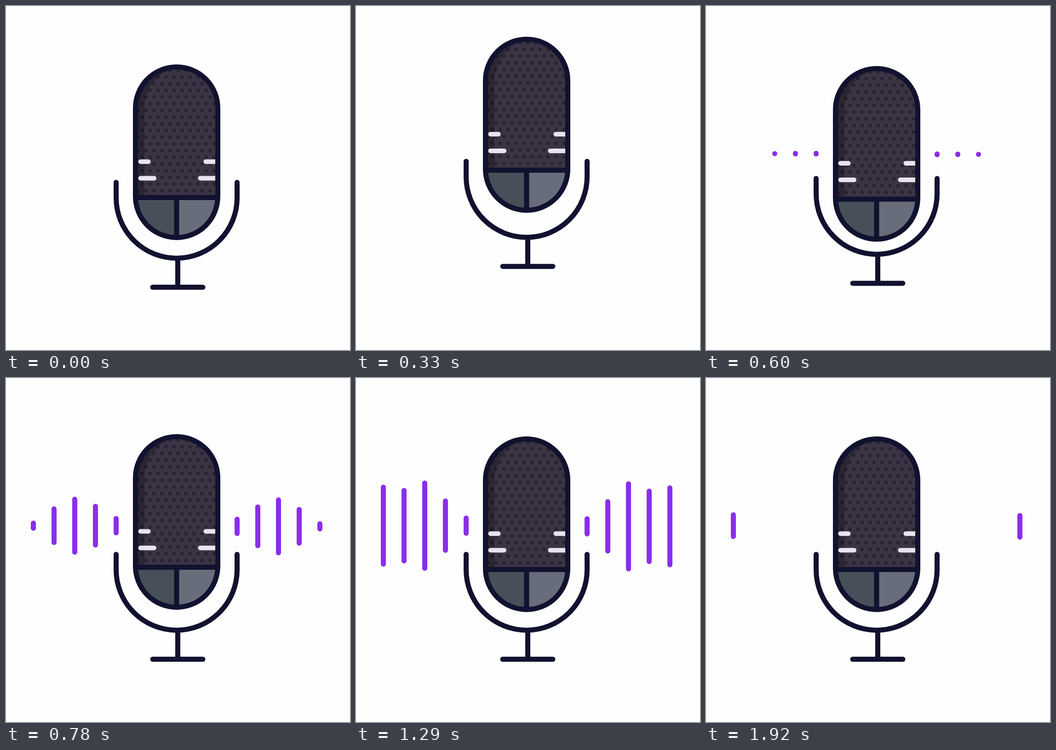
Write an HTML page without scripts that moves like this. It is 748 by 748 pixels and loops after 3.95 s.

```html
<!DOCTYPE html>
<html lang="en">
<head>
<meta charset="utf-8">
<title>Microphone</title>
<style>
  @property --h { syntax: "<length>"; inherits: false; initial-value: 0px; }

  html, body { margin: 0; width: 100%; height: 100%; overflow: hidden; background: #fefefe; }
  svg { display: block; width: 100%; height: 100%; }

  .line { fill: none; stroke: #11122f; stroke-width: 11; stroke-linecap: round; }
  .dash rect { fill: #e8e4ee; height: 10px; rx: 5px; }

  .stand, .head, .stretch, .bar {
    animation: 3950ms cubic-bezier(.4, 0, .6, 1) infinite;
  }
  .stand { animation-name: stand; transform-origin: 371px 611px; }
  .head { animation-name: head; }
  .stretch { animation-name: stretch; transform-origin: 371px 509px; }

  @keyframes stand {
    0% { translate: 0 0; scale: 1; }
    5.32% { scale: 1 1.01; }
    9.62% { translate: 0 -47px; scale: 1; }
    17.5%, 100% { translate: 0 0; scale: 1; }
  }
  @keyframes head {
    0%, 2.78% { translate: 0 0; }
    9.49% { translate: 0 -63px; }
    15.57% { translate: 0 4px; }
    19.75% { translate: 0 -5px; }
    25.82% { translate: 0 5.3px; }
    31.4%, 100% { translate: 0 0; }
  }
  @keyframes stretch {
    0%, 2.78% { scale: 1; }
    5.32% { scale: 1 1.015; }
    9.49%, 100% { scale: 1; }
  }

  /* Sound bars grow from their middle; numbered from the microphone outwards. */
  .bar {
    fill: #8a2eea;
    width: 11px;
    height: var(--h);
    y: calc(var(--h) / -2);
    rx: 5.5px;
  }
  .b1 { x: 234px; animation-name: b1; }
  .b2 { x: 189px; animation-name: b2; }
  .b3 { x: 144px; animation-name: b3; }
  .b4 { x: 99px; animation-name: b4; }
  .b5 { x: 54px; animation-name: b5; }

  @keyframes b1 {
    0%, 14.4% { --h: 0px; }
    14.41% { --h: 11px; }
    19.75% { --h: 42px; }
    25.82% { --h: 50px; }
    32.66% { --h: 44px; }
    39.5% { --h: 11px; }
    39.51%, 100% { --h: 0px; }
  }
  @keyframes b2 {
    0%, 14.8% { --h: 0px; }
    14.81% { --h: 11px; }
    19.75% { --h: 95px; }
    25.82% { --h: 104px; }
    32.66% { --h: 118px; }
    42.5% { --h: 11px; }
    42.51%, 100% { --h: 0px; }
  }
  @keyframes b3 {
    0%, 15.2% { --h: 0px; }
    15.21% { --h: 11px; }
    19.75% { --h: 126px; }
    25.82% { --h: 55px; }
    32.66% { --h: 196px; }
    36.5% { --h: 220px; }
    45.5% { --h: 11px; }
    45.51%, 100% { --h: 0px; }
  }
  @keyframes b4 {
    0%, 16% { --h: 0px; }
    16.01% { --h: 11px; }
    19.75% { --h: 84px; }
    25.82% { --h: 32px; }
    32.66% { --h: 164px; }
    38.7% { --h: 240px; }
    47.8% { --h: 11px; }
    47.81%, 100% { --h: 0px; }
  }
  @keyframes b5 {
    0%, 17.5% { --h: 0px; }
    17.51% { --h: 11px; }
    19.75% { --h: 22px; }
    25.82% { --h: 40px; }
    32.66% { --h: 178px; }
    41% { --h: 306px; }
    48.61%, 100% { --h: 58px; }
  }
</style>
</head>
<body>
<svg viewBox="0 0 748 748">
  <defs>
    <pattern id="mesh" x="361" y="147" width="17.4" height="29.1" patternUnits="userSpaceOnUse">
      <circle cx="4.35" cy="7.28" r="4" fill="#282231"/>
      <circle cx="13.05" cy="21.83" r="4" fill="#282231"/>
    </pattern>
    <path id="grille" d="M281.5 416.5V222a89.5 89.5 0 0 1 179 0V416.5z"/>
  </defs>

  <g transform="translate(0 321)">
    <rect class="bar b1"/>
    <rect class="bar b2"/>
    <rect class="bar b3"/>
    <rect class="bar b4"/>
    <rect class="bar b5"/>
  </g>
  <g transform="translate(742 322.5) scale(-1 1)">
    <rect class="bar b1"/>
    <rect class="bar b2"/>
    <rect class="bar b3"/>
    <rect class="bar b4"/>
    <rect class="bar b5"/>
  </g>

  <g class="stand">
    <path class="line" d="M239.5 383.5V417a131.5 131.5 0 0 0 263 0V383.5M373.5 549V611.5M319 611.5H428"/>
  </g>

  <g class="head">
    <g class="stretch">
      <use href="#grille" fill="#3b3444"/>
      <use href="#grille" fill="url(#mesh)"/>
      <path d="M283 414V222A88 88 0 0 1 371 134C331 142 301 176 301 225V414z" fill="#000" opacity=".27"/>
      <path d="M371 416.5V503.5A89.5 89.5 0 0 1 281.5 416.5z" fill="#474f59"/>
      <path d="M371 416.5V503.5A89.5 89.5 0 0 0 460.5 416.5z" fill="#676d7b"/>
      <g class="dash">
        <rect x="287.5" y="333.5" width="27"/>
        <rect x="287.5" y="369.5" width="39.5"/>
        <rect x="429.5" y="333.5" width="32"/>
        <rect x="417.5" y="369.5" width="44"/>
      </g>
      <path class="line" d="M281.5 222a89.5 89.5 0 0 1 179 0V414a89.5 89.5 0 0 1-179 0zM281.5 416.5H460.5M371 416.5V503.5"/>
    </g>
  </g>
</svg>
</body>
</html>
```
